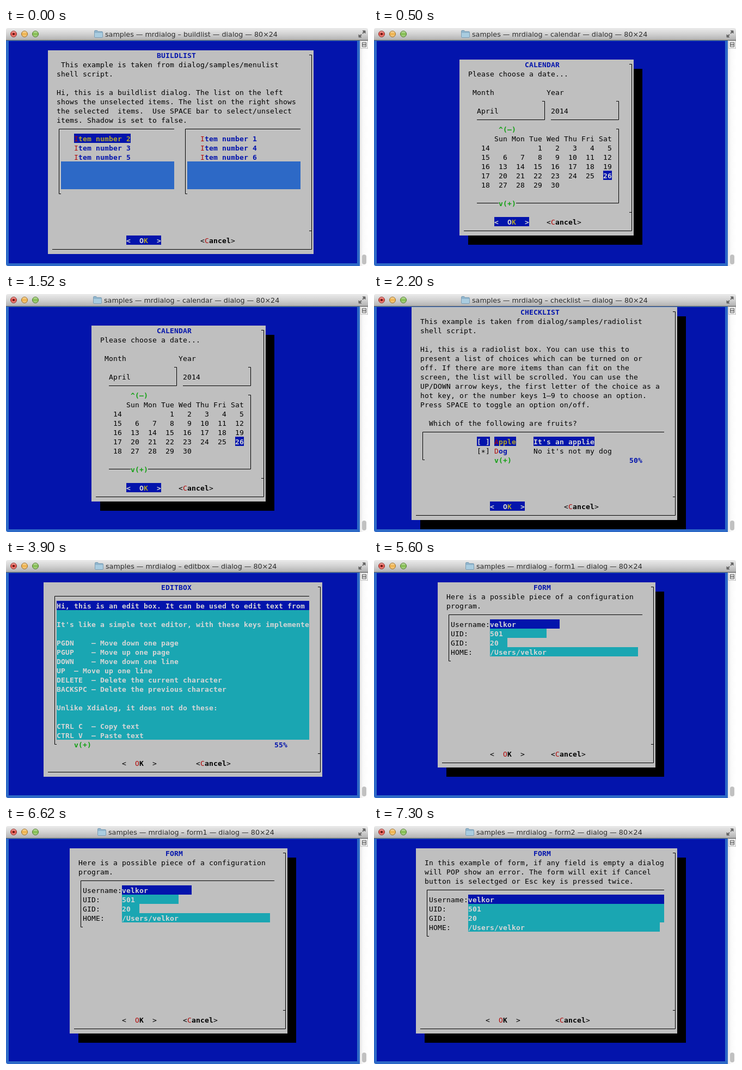
Write an HTML page that moves like this. It is 665x437 px and loops after 8000 ms.

```html
<!DOCTYPE html>
<html lang="en">
<head>
<meta charset="utf-8">
<title>mrdialog samples</title>
<style>
  :root {
    --blue: #0314ac; --pad: #2d69c6; --grey: #bfbfbf; --cyan: #1aa6b2;
    --white: #d6d6d6; --red: #b00a0a; --yellow: #b3a52c; --green: #12a012;
    --bar: linear-gradient(#ebebeb, #d2d2d2 50%, #b2b2b2);
  }
  html, body { margin: 0; width: 100%; height: 100%; overflow: hidden; background: #fff; }
  #win { position: absolute; left: 0; top: 0; width: 665px; height: 437px; overflow: hidden; background: #fff; }
  #win div, #win i, #win svg { position: absolute; }
  #bar { left: 0; top: 0; width: 665px; height: 22px; background: var(--bar); border-bottom: 1px solid #5e5e5e; border-radius: 4px 4px 0 0; }
  #pad { left: 0; top: 23px; width: 650px; height: 414px; background: var(--pad); border-radius: 0 0 0 4px; }
  #chrome { left: 0; top: 0; }

  .screen { left: 0; top: 0; width: 665px; height: 437px; animation: 8s step-end infinite; }
  .title {
    left: 100px; top: 0; width: 480px; height: 22px; background: var(--bar);
    font: 12.7px/23px "DejaVu Sans", sans-serif; color: #2c2c2c; white-space: pre;
  }
  .title div { top: 0; }
  .title svg { top: 4px; }
  .term { left: 5px; top: 24px; width: 640px; height: 408px; background: var(--blue); overflow: hidden; }
  .term svg { left: 0; top: 0; fill: none; stroke: #000; }
  #win .term i {
    height: 17px; overflow: hidden; white-space: pre; color: #000;
    font: normal 13px/19px "DejaVu Sans Mono", monospace; letter-spacing: calc(8px - 1ch);
  }
  #win .term .b { font-weight: bold; }
  #win .term .blue { color: var(--blue); }
  #win .term .red { color: var(--red); }
  #win .term .green { color: var(--green); background: var(--grey); }
  #win .term .yellow { color: var(--yellow); }
  #win .term .white { color: var(--white); }
  #win .term .sel { background: var(--blue); }

  #s1 { animation-name: at1; }
  #s2 { animation-name: at2; }
  #s3 { animation-name: at3; }
  #s4 { animation-name: at4; }
  #s5 { animation-name: at5; }
  @keyframes at1 { 0% { opacity: 0 } 6.25%, 100% { opacity: 1 } }
  @keyframes at2 { 0% { opacity: 0 } 27.5%, 100% { opacity: 1 } }
  @keyframes at3 { 0% { opacity: 0 } 48.75%, 100% { opacity: 1 } }
  @keyframes at4 { 0% { opacity: 0 } 70%, 100% { opacity: 1 } }
  @keyframes at5 { 0% { opacity: 0 } 91.25%, 100% { opacity: 1 } }
</style>
</head>
<body>
<div id="win">
  <div id="bar"></div>
  <div id="pad"></div>
  <svg id="chrome" width="665" height="437">
    <defs>
      <linearGradient id="track"><stop offset="0" stop-color="#e6e6e6"/><stop offset=".4" stop-color="#fafafa"/><stop offset="1" stop-color="#fff"/></linearGradient>
      <linearGradient id="shine" x2="0" y2="1"><stop offset="0" stop-color="#fff" stop-opacity=".55"/><stop offset=".5" stop-color="#fff" stop-opacity="0"/><stop offset="1" stop-color="#fff" stop-opacity=".4"/></linearGradient>
    </defs>
    <g stroke-width="1">
      <circle cx="14" cy="11" r="5.5" fill="#e0483f" stroke="#8d3029"/>
      <circle cx="34" cy="11" r="5.5" fill="#eeb046" stroke="#9b6d25"/>
      <circle cx="54" cy="11" r="5.5" fill="#7fbb4a" stroke="#4d7a2a"/>
    </g>
    <g fill="url(#shine)">
      <circle cx="14" cy="11" r="5"/><circle cx="34" cy="11" r="5"/><circle cx="54" cy="11" r="5"/>
    </g>
    <circle cx="14" cy="11" r="2" fill="#5c1410"/>
    <g fill="#666" stroke="#666" stroke-width="2">
      <path d="M655 5H660V10Z M648 12V17H653Z" stroke-width="1"/>
      <path d="M655 10L658 7M653 12L650 15" fill="none"/>
    </g>
    <rect x="650" y="23" width="15" height="414" fill="url(#track)"/>
    <rect x="651.5" y="23.5" width="13" height="14" fill="#f2f2f2" stroke="#c4c4c4"/>
    <path d="M654.5 26.5H661.5V34.5H654.5ZM654 29.5H662M654 31.5H662" fill="none" stroke="#555"/>
    <rect x="654" y="416" width="8" height="18" rx="4" fill="#c1c1c1"/>
  </svg>
</div>
<script>
const CW = 8, CH = 17;

const fill = (c, r, w, h, color) =>
  `<div style="left:${c * CW}px;top:${r * CH}px;width:${w * CW}px;height:${h * CH}px;background:${color}"></div>`;

const put = (c, r, text, cls = '') =>
  `<i class="${cls}" style="left:${c * CW}px;top:${r * CH}px;width:${text.length * CW}px">${text.replace(/</g, '&lt;')}</i>`;

const lines = (c, r, list, cls) => list.map((s, k) => s && put(c, r + k, s, cls)).join('');

const stroke = d => `<svg width="640" height="408"><path d="${d}"/></svg>`;
const midX = c => c * CW + 4.5;
const midY = r => r * CH + 8.5;

// Dark right and bottom edges of a box whose right column is c1
const lowEdge = (c0, r0, c1, r1) =>
  stroke(`M${c1 * CW} ${midY(r0)}H${midX(c1)}V${midY(r1)}H${c0 * CW}`);

// Dark top and left edges of a box, open at column c1
const highEdge = (c0, r0, c1, r1) =>
  stroke(`M${c1 * CW} ${midY(r0)}H${midX(c0)}V${midY(r1)}H${(c0 + 1) * CW}`);

function dialog(c, r, w, h, shadow) {
  const right = c + w - 1, low = r + h - 1;
  return (shadow ? fill(c + 2, r + 1, w, h, '#000') : '') +
    fill(c, r, w, h, 'var(--grey)') +
    lowEdge(c + 1, r, right, low) +
    stroke(`M${right * CW} ${midY(low - 2)}h4`);
}

const hot = (c, r, s, rest, first = 'red') =>
  put(c, r, s[0], first) + put(c + 1, r, s.slice(1), rest);

function buttons(r, ok, cancel, active) {
  const okay = active
    ? put(ok, r, '<  O', 'b white sel') + put(ok + 4, r, 'K', 'b yellow sel') + put(ok + 5, r, '  >', 'b white sel')
    : put(ok, r, '<') + hot(ok + 3, r, 'OK', 'b') + put(ok + 7, r, '>');
  return okay + put(cancel, r, '<') + hot(cancel + 1, r, 'Cancel', 'b') + put(cancel + 7, r, '>');
}

const heading = (c, r, s) => put(c, r, s, 'b blue');

function buildlist() {
  const item = (c, r, n) => hot(c, r, 'Item number ' + n, 'b blue');
  const side = (c, items) => highEdge(c, 9, c + 27, 16) +
    fill(c + 1, 13, 26, 3, 'var(--pad)') +
    items.map((n, k) => item(c + 4, 10 + k, n)).join('');
  return dialog(9, 1, 61, 22) + heading(34, 1, 'BUILDLIST') +
    lines(11, 2, [
      ' This example is taken from dialog/samples/menulist',
      'shell script.', '',
      'Hi, this is a buildlist dialog. The list on the left',
      'shows the unselected items. The list on the right shows',
      'the selected  items.  Use SPACE bar to select/unselect',
      'items. Shadow is set to false.']) +
    side(11, [2, 3, 5]) + side(40, [1, 4, 6]) +
    hot(15, 10, 'Item number 2', 'b yellow sel', 'red sel') +
    buttons(21, 27, 44, true);
}

function calendar() {
  let days = '';
  for (let d = 1; d <= 30; d++) {
    const cell = d + 1;
    days += put(28 + cell % 7 * 4, 11 + Math.floor(cell / 7), String(d).padStart(2), d === 26 ? 'b white sel' : '');
  }
  return dialog(19, 2, 40, 19, true) + heading(34, 2, 'CALENDAR') +
    put(21, 3, 'Please choose a date...') +
    put(22, 5, 'Month') + put(39, 5, 'Year') +
    lowEdge(23, 6, 38, 8) + lowEdge(40, 6, 55, 8) +
    put(23, 7, 'April') + put(40, 7, '2014') +
    lowEdge(23, 9, 55, 17) +
    put(28, 9, '^(–)', 'b green') + put(28, 17, 'v(+)', 'b green') +
    put(27, 10, 'Sun Mon Tue Wed Thu Fri Sat') +
    lines(24, 11, ['14', '15', '16', '17', '18']) + days +
    buttons(19, 27, 39, true);
}

function checklist() {
  return dialog(8, 0, 61, 23, true) + heading(33, 0, 'CHECKLIST') +
    lines(10, 1, [
      'This example is taken from dialog/samples/radiolist',
      'shell script.', '',
      'Hi, this is a radiolist box. You can use this to',
      'present a list of choices which can be turned on or',
      'off. If there are more items than can fit on the',
      'screen, the list will be scrolled. You can use the',
      'UP/DOWN arrow keys, the first letter of the choice as a',
      'hot key, or the number keys 1–9 to choose an option.',
      'Press SPACE to toggle an option on/off.', '',
      '  Which of the following are fruits?']) +
    highEdge(10, 13, 66, 16) +
    put(23, 14, '[ ]', 'b white sel') + hot(27, 14, 'Apple', 'b yellow sel', 'red sel') +
    put(36, 14, "It's an applie", 'b white sel') +
    put(23, 15, '[∗]') + hot(27, 15, 'Dog', 'b blue') + put(36, 15, "No it's not my dog") +
    put(27, 16, 'v(+)', 'b green') + put(58, 16, '50%', 'b blue') +
    buttons(21, 26, 43, true);
}

function editbox() {
  return dialog(8, 1, 64, 21) + heading(35, 1, 'EDITBOX') +
    highEdge(10, 2, 69, 18) +
    fill(11, 3, 58, 15, 'var(--cyan)') + fill(11, 3, 58, 1, 'var(--blue)') +
    lines(11, 3, [
      'Hi, this is an edit box. It can be used to edit text from', '',
      "It's like a simple text editor, with these keys implemente", '',
      'PGDN    – Move down one page',
      'PGUP    – Move up one page',
      'DOWN    – Move down one line',
      'UP  – Move up one line',
      'DELETE  – Delete the current character',
      'BACKSPC – Delete the previous character', '',
      'Unlike Xdialog, it does not do these:', '',
      'CTRL C  – Copy text',
      'CTRL V  – Paste text'], 'b white') +
    put(15, 18, 'v(+)', 'b green') + put(61, 18, '55%', 'b blue') +
    buttons(20, 26, 43);
}

function fields(c, r, widths) {
  const values = ['velkor', '501', '20', '/Users/velkor'];
  return lines(c, r, ['Username:', 'UID:', 'GID:', 'HOME:']) +
    widths.map((w, k) => fill(c + 9, r + k, w, 1, k ? 'var(--cyan)' : 'var(--blue)')).join('') +
    lines(c + 9, r, values, 'b white');
}

function form1() {
  return dialog(14, 1, 50, 20, true) + heading(36, 1, 'FORM') +
    lines(16, 2, ['Here is a possible piece of a configuration', 'program.']) +
    highEdge(16, 4, 61, 9) + fields(17, 5, [16, 13, 4, 34]) +
    buttons(19, 26, 40);
}

function form2() {
  return dialog(9, 1, 60, 20, true) + heading(36, 1, 'FORM') +
    lines(11, 2, [
      'In this example of form, if any field is empty a dialog',
      'will POP show an error. The form will exit if Cancel',
      'button is selectged or Esc key is pressed twice.']) +
    highEdge(11, 5, 66, 10) + fields(12, 6, [45, 45, 45, 44]) +
    buttons(19, 25, 41);
}

const folder = '<path d="M.5 3V2Q.5 .5 2 .5H5.5L7 2.5H14Q15.5 2.5 15.5 4V12Q15.5 13.5 14 13.5H2Q.5 13.5 .5 12Z" fill="#8fb4cc" stroke="#7d9fb5"/>' +
  '<path d="M1 5H15V12Q15 13 14 13H2Q1 13 1 12Z" fill="#a9cce0"/>';

// name, left of the title text, content
const screens = [
  ['buildlist', 182, buildlist],
  ['calendar', 180, calendar],
  ['checklist', 180, checklist],
  ['editbox', 183, editbox],
  ['form1', 188, form1],
  ['form2', 188, form2]
];

document.getElementById('win').insertAdjacentHTML('beforeend', screens.map(([name, x, draw], k) =>
  `<div class="screen" id="s${k}">
    <div class="title">
      <svg width="16" height="14" style="left:${x - 120}px">${folder}</svg>
      <div style="left:${x - 100}px">samples — mrdialog – ${name} — dialog — 80×24</div>
    </div>
    <div class="term">${draw()}</div>
  </div>`).join(''));
</script>
</body>
</html>
```
